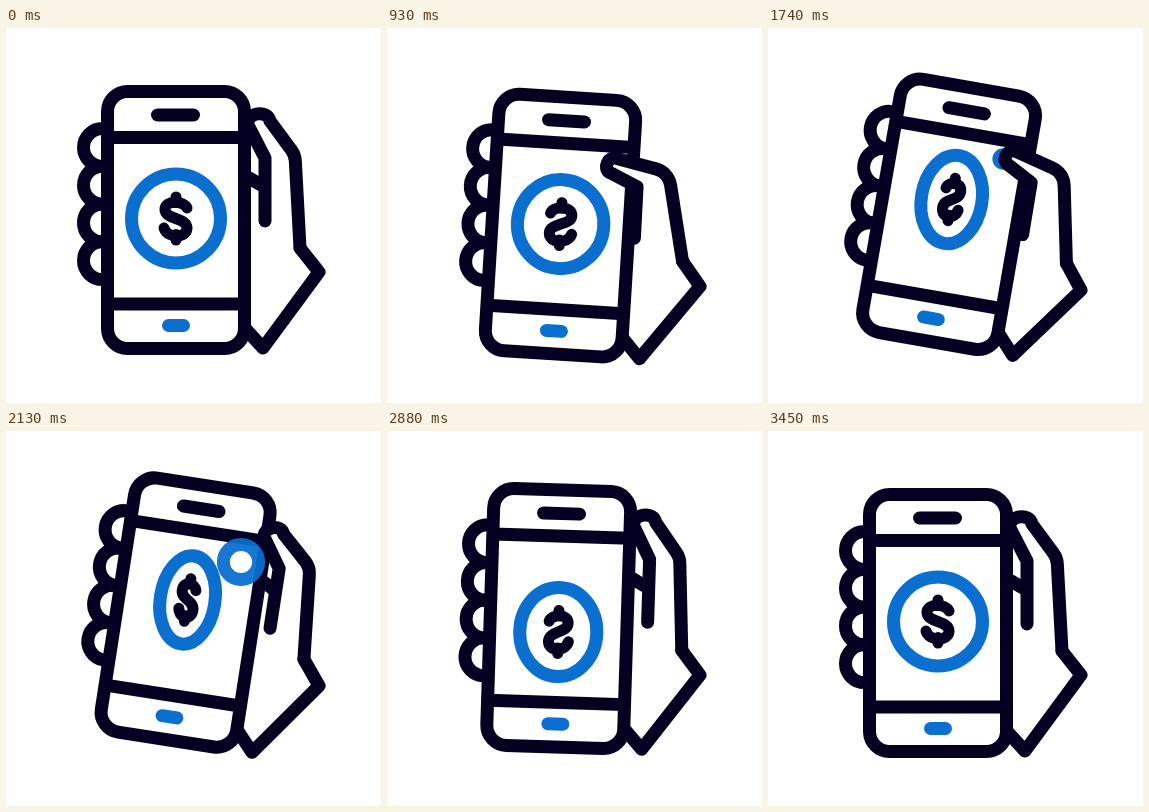
An HTML page with a canvas for the animation above (4.23 s loop, 375 px wide and 375 px high).

```html
<!DOCTYPE html>
<html lang="en">
<head>
<meta charset="utf-8">
<title>Mobile payment</title>
<style>
  html, body { margin: 0; width: 100%; height: 100%; overflow: hidden; background: #fff; }
  canvas { display: block; width: 375px; height: 375px; }
</style>
</head>
<body>
<canvas id="stage"></canvas>
<script>
const SIZE = 375, LOOP = 4230, STEP = 30;
const DARK = '#030021', BLUE = '#0a6fce', WHITE = '#fff';
const WRIST = { x: 313, y: 244 };

const canvas = document.getElementById('stage');
const ratio = window.devicePixelRatio || 1;
canvas.width = canvas.height = Math.round(SIZE * ratio);
const ctx = canvas.getContext('2d');

const mix = (a, b, p) => a + (b - a) * p;
const part = (t, from, to) => Math.min(1, Math.max(0, (t - from) / (to - from)));
const ease = (t, from, to) => (1 - Math.cos(Math.PI * part(t, from, to))) / 2;
const radians = deg => deg * Math.PI / 180;

// The whole hand dips quickly, rises softly, and leans around the wrist.
const sink = t => 19.3 * (1 - (1 - part(t, 330, 1540)) ** 2 - ease(t, 1540, 2820));
const tilt = t => 9.95 * (ease(t, 330, 1800) - ease(t, 1800, 3300));
const press = t => ease(t, 330, 710) - ease(t, 1580, 2380);
const coinShift = t => 15 * (2 * ease(t, 1900, 2900) - ease(t, 1100, 1900) - ease(t, 2900, 3450));

// Three turns of the coin: [time, degrees].
const TURNS = [[540, 0], [1260, 307], [1740, 493], [2130, 668], [2880, 930], [3450, 1080]];
const spin = t => TURNS.slice(1).reduce((sum, [time, deg], i) =>
  sum + (deg - TURNS[i][1]) * part(t, TURNS[i][0], time), 0);

function stroke(color, width = 13) {
  ctx.strokeStyle = color;
  ctx.lineWidth = width;
  ctx.stroke();
}

function line(points, color = DARK) {
  ctx.beginPath();
  points.forEach(([x, y]) => ctx.lineTo(x, y));
  stroke(color);
}

function drawHand() {
  for (let i = 0; i < 4; i++) {
    ctx.beginPath();
    ctx.arc(96.5, 119.5 + i * 37.7, 19, 0, 7);
    stroke(DARK);
  }
  line([[236, 297], [257, 320], [313, 244], [294, 220]]);
  line([[243, 150], [257, 158]]);
}

function drawPhone() {
  ctx.beginPath();
  ctx.roundRect(101.5, 63.5, 137, 257, 20);
  ctx.fillStyle = WHITE;
  ctx.fill();
  stroke(DARK);
  line([[102, 109.5], [238, 109.5]]);
  line([[102, 276], [238, 276]]);
  line([[151.5, 87], [187.5, 87]]);
  line([[162.5, 297.5], [177.5, 297.5]], BLUE);
}

function drawCoin(t) {
  const c = Math.cos(radians(spin(t)));
  ctx.save();
  ctx.translate(170, 190.5 + coinShift(t));
  ctx.beginPath();
  ctx.ellipse(0, 0, 44.5 * Math.abs(c), 44.5, 0, 0, 7);
  stroke(BLUE);
  // Only the path is squeezed, so the line keeps its weight.
  ctx.beginPath();
  ctx.moveTo(11 * c, -10.5);
  ctx.bezierCurveTo(8 * c, -18, -11 * c, -19, -11 * c, -9);
  ctx.bezierCurveTo(-11 * c, 1, 11 * c, -1, 11 * c, 9.5);
  ctx.bezierCurveTo(11 * c, 20, -9 * c, 20, -12 * c, 9.5);
  for (const side of [-1, 1]) {
    ctx.moveTo(0, side * 16);
    ctx.lineTo(0, side * 21.5);
  }
  stroke(DARK, 11);
  ctx.restore();
}

function drawRipple(t) {
  if (t < 1620 || t > 2400) return;
  ctx.globalAlpha = 1 - ease(t, 2080, 2400);
  ctx.beginPath();
  ctx.arc(235, 131, (t - 1620) * 0.0345, 0, 7);
  stroke(BLUE);
  ctx.globalAlpha = 1;
}

function drawThumb(t) {
  const p = press(t);
  const between = (x0, y0, x1, y1) => [mix(x0, x1, p), mix(y0, y1, p)];
  const knuckle = between(289, 127, 274.5, 132);
  const [ax, ay] = between(264, 93, 222, 121.5);
  const [bx, by] = between(242, 97, 216, 136);
  // The tip bulges at right angles to the line across it.
  const nx = (ay - by) * 0.55, ny = (bx - ax) * 0.55;
  ctx.beginPath();
  ctx.moveTo(294, 220);
  ctx.arcTo(...knuckle, ax, ay, 20);
  ctx.lineTo(ax, ay);
  ctx.bezierCurveTo(ax + nx, ay + ny, bx + nx, by + ny, bx, by);
  ctx.lineTo(...between(259, 130, 244, 148.5));
  ctx.lineTo(...between(259, 193, 244.5, 200));
  ctx.fillStyle = WHITE;
  ctx.fill();
  stroke(DARK);
}

function posed(t, draw) {
  ctx.save();
  ctx.translate(WRIST.x, WRIST.y + sink(t));
  ctx.rotate(radians(tilt(t)));
  ctx.translate(-WRIST.x, -WRIST.y);
  draw(t);
  ctx.restore();
}

function render(t) {
  ctx.setTransform(ratio, 0, 0, ratio, 0, 0);
  ctx.fillStyle = WHITE;
  ctx.fillRect(0, 0, SIZE, SIZE);
  ctx.lineCap = ctx.lineJoin = 'round';
  [drawHand, drawPhone, drawCoin].forEach(draw => posed(t, draw));
  drawRipple(t);
  posed(t, drawThumb);
}

const start = performance.now();
function tick() {
  const t = (performance.now() - start) % LOOP;
  render(Math.floor(t / STEP) * STEP);
  requestAnimationFrame(tick);
}
tick();
</script>
</body>
</html>
```
